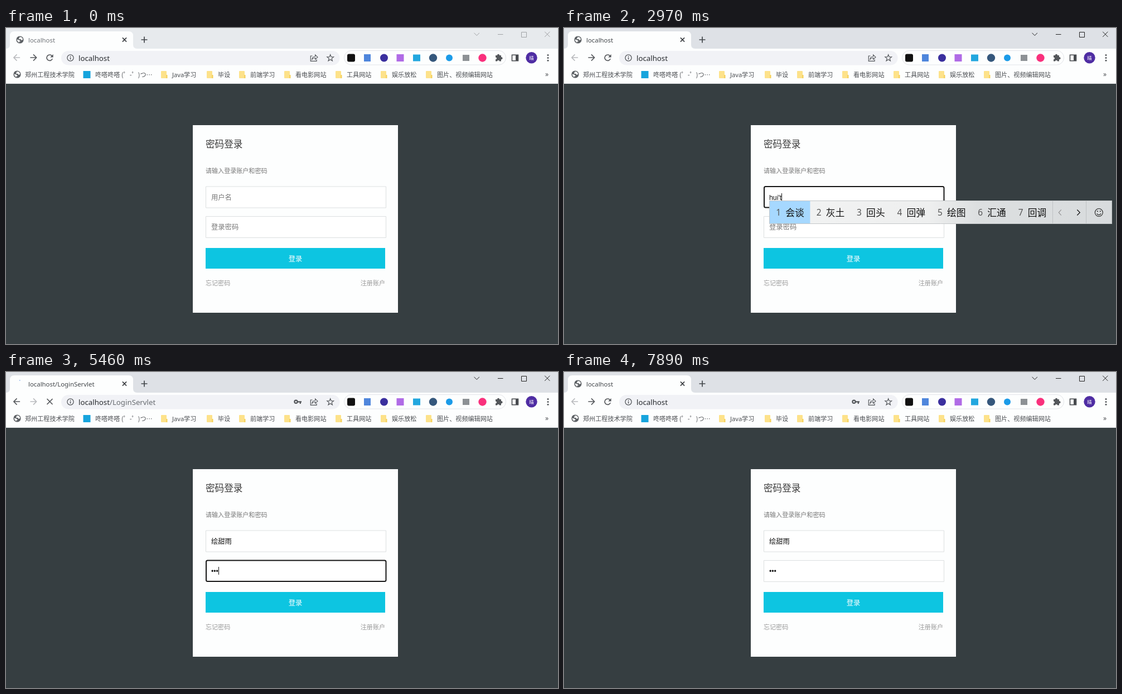
These frames come from a looping animation (990x566 px, 8 s). An HTML page with a canvas:

```html
<!DOCTYPE html>
<html lang="zh-CN">
<head>
<meta charset="utf-8">
<title>Login</title>
<style>
html, body { margin: 0; width: 100%; height: 100%; overflow: hidden; background: #fdfefe; }
canvas { display: block; width: 990px; height: 566px; }
</style>
</head>
<body>
<canvas id="stage"></canvas>
<script>
const W = 990, H = 566, LOOP = 8000;
const canvas = document.getElementById('stage');
const dpr = window.devicePixelRatio || 1;
canvas.width = W * dpr;
canvas.height = H * dpr;
const c = canvas.getContext('2d');

const UI = '"Noto Sans", "Noto Sans CJK SC", sans-serif';
const HAN = '"Noto Sans CJK SC", "Noto Sans CJK", sans-serif';
const ARIAL = '"Liberation Sans", "Noto Sans CJK SC", sans-serif';
const DARK = '#54575b', FAINT = '#b9bbbe', PAPER = '#fdfefe';
const NAME = '绘甜雨';

// Typed letters: time, composed text
const KEYS = [
  [2460, 'h'], [2610, 'hu'], [2760, 'hui'], [2970, "hui't"], [3060, "hui'ti"],
  [3180, "hui'tia"], [3300, "hui'tian"], [3450, "hui'tian'y"], [3510, "hui'tian'yu"]
];
const CHOICES = [
  [2460, '和 好 会 还 后 很 或'],
  [2610, '户 湖 胡 虎 护 呼 互'],
  [2760, '会 回 汇 灰 惠 绘 挥'],
  [2970, '会谈 灰土 回头 回弹 绘图 汇通 回调'],
  [3180, '回天 会填 回填 汇添 绘甜 灰田 惠田'],
  [3450, NAME + ' 回天 会填 回填 汇添 绘甜 灰田']
];
const BOOKMARKS = [
  [298, 'Java学习'], [380, '毕设'], [438, '前端学习'], [519, '看电影网站'],
  [611, '工具网站'], [692, '娱乐放松'], [773, '图片、视频编辑网站']
];

const within = (t, a, b) => t >= a && t < b;
const latest = (list, t) => list.filter(e => e[0] <= t).pop()[1];

function rect(x, y, w, h, color) {
  c.fillStyle = color;
  c.fillRect(x, y, w, h);
}
function round(x, y, w, h, r, fill, stroke, lw = 1) {
  c.beginPath();
  c.roundRect(x, y, w, h, r);
  if (fill) { c.fillStyle = fill; c.fill(); }
  if (stroke) { c.strokeStyle = stroke; c.lineWidth = lw; c.stroke(); }
}
function disc(x, y, r, color) {
  c.beginPath();
  c.arc(x, y, r, 0, 7);
  c.fillStyle = color;
  c.fill();
}
function ring(x, y, r, color, lw = 1.3, from = 0, to = Math.PI * 2) {
  c.beginPath();
  c.arc(x, y, r, from, to);
  c.strokeStyle = color;
  c.lineWidth = lw;
  c.stroke();
}
function path(d, color, lw = 1.5, fill) {
  const p = new Path2D(d);
  if (fill) { c.fillStyle = color; c.fill(p); return; }
  c.strokeStyle = color;
  c.lineWidth = lw;
  c.stroke(p);
}
// cy is the middle of the tall letters
function text(s, x, cy, size, color, font = UI, align = 'left', weight = 400) {
  c.font = `${weight} ${size}px ${font}`;
  c.textAlign = align;
  c.fillStyle = color;
  c.fillText(s, x, cy + size * 0.37);
  return c.measureText(s).width;
}
function cross(x, y, r, color, lw) {
  path(`M${x - r} ${y - r}L${x + r} ${y + r}M${x + r} ${y - r}L${x - r} ${y + r}`, color, lw);
}

function globe(x, y) {
  c.save();
  c.translate(x, y);
  disc(0, 0, 6.6, '#5c6064');
  path('M-1 -5 L3 -4.6 Q5.6 -2 5 0 L2.4 1 L1.6 -1 L-1.4 -1 L-2.4 -2.8 L-.6 -3 Z', '#fff', 1, true);
  path('M-5.2 -.4 L-2 .2 L.6 2 L.2 3.4 L-1.4 3.2 L-1.6 5.2 Q-5 3.4 -5.2 -.4 Z', '#fff', 1, true);
  c.restore();
}

function arrow(x, dir, color) {
  const y = 53, tip = x + 5.6 * dir;
  path(`M${x - 5.6 * dir} ${y}H${tip}M${x} ${y - 5.6}L${tip} ${y}L${x} ${y + 5.6}`, color, 1.6);
}

function star(x, y) {
  c.beginPath();
  for (let i = 0; i < 10; i++) {
    const r = i % 2 ? 2.6 : 6.2, a = i * Math.PI / 5 - Math.PI / 2;
    c.lineTo(x + r * Math.cos(a), y + r * Math.sin(a));
  }
  c.closePath();
  c.strokeStyle = DARK;
  c.lineWidth = 1.2;
  c.stroke();
}

function tabStrip(s) {
  rect(0, 0, W, 37, s.active ? '#dee1e6' : '#e7eaed');
  path('M0 37Q7 37 7 30V14Q7 6 15 6H220Q228 6 228 14V30Q228 37 235 37Z', PAPER, 1, true);
  if (s.loading) ring(25, 21, 6, '#7fa9ea', 1.5, -1.75, -1.5);
  else globe(25, 21);
  text(s.title, 40, 21.5, 11.36, s.active ? '#43474b' : '#71757a');
  cross(212.5, 21, 3.6, '#36393d', 1.5);
  path('M242.5 21H253.5M248 15.5V26.5', '#43474b', 1.7);

  const k = s.active ? '#222' : '#a0a2a5';
  path('M839.5 8.8L844.2 13.5L849 8.8', k, 1);
  path('M882 11.5H891.5', k, 1);
  path('M924.5 7.5H933.5V16.5H924.5Z', k, 1);
  cross(970.8, 11.3, 4.6, k, 1);
}

function toolbar(s) {
  rect(0, 37, W, 62, PAPER);
  if (s.hover > 0) {
    c.globalAlpha = s.hover;
    disc(20, 53, 13, '#e6e7e9');
    c.globalAlpha = 1;
  }
  arrow(19.5, -1, s.canBack ? DARK : FAINT);
  arrow(49, 1, s.canBack ? FAINT : DARK);
  if (s.loading) cross(78.5, 53, 5, DARK, 1.7);
  else {
    ring(78.3, 53.2, 5.2, DARK, 1.6, 0.35, 5.6);
    path('M84.6 47V52.4H79.2Z', DARK, 1, true);
  }

  round(99, 41, 499.5, 25.5, 12.8, '#f1f2f6');
  ring(115.5, 53.5, 5.6, DARK, 1.3);
  rect(114.8, 52.7, 1.5, 3.8, DARK);
  rect(114.8, 50.2, 1.5, 1.5, DARK);
  const w = text('localhost', 130, 54, 13.25, '#26292d');
  if (s.servlet) text('/LoginServlet', 130 + w, 54, 13.25, '#686c71');
  if (s.key) {
    ring(520, 53.3, 2.6, DARK, 2.2);
    path('M522.5 53.3H530M527.8 53.5V57', DARK, 2.2);
  }
  path('M549.5 50H546.3V59.3H557V56.3', DARK, 1.2);
  path('M548.8 56.2Q549.5 51.2 554.6 51V48L559 52.2L554.6 56.2V53.5Q551 53.4 548.8 56.2Z', DARK, 1.1);
  star(581.7, 53.8);
  extensions();
}

function extensions() {
  round(606.5, 40.5, 290, 25.5, 12.8, PAPER, '#e2e4e8');
  round(612, 46.5, 14, 14, 3, '#111');
  rect(642, 47, 12, 13, '#4f86dc');
  disc(678, 53.5, 7, '#3a2f9e');
  rect(700.5, 47, 13, 13, '#b06be6');
  rect(730, 47.5, 13, 12, '#22a7df');
  disc(766, 53.5, 7.2, '#35577c');
  disc(795, 53.5, 6, '#1b9be8');
  rect(819, 48, 12, 11, '#8d9195');
  disc(854.5, 53.5, 7.2, '#f9307c');

  rect(878, 49, 10, 10.5, DARK);
  disc(883, 48.8, 2.1, DARK);
  disc(888.4, 54.2, 2.1, DARK);
  disc(878.2, 54.4, 1.8, PAPER);
  disc(883, 59.6, 1.8, PAPER);

  path('M907.5 48.2H918.5V58.8H907.5Z', '#484b4f', 1.6);
  rect(914, 48, 5, 11, '#484b4f');
  disc(942.5, 53.3, 10.2, '#4f2da3');
  text('晴', 942.5, 53.5, 8.5, '#fff', HAN, 'center');
  for (const y of [48.6, 53.4, 58.2]) disc(972, y, 1.5, DARK);
}

function bookmarks() {
  const ink = '#4a4d51';
  globe(20, 83);
  text('郑州工程技术学院', 34, 84, 11.1, ink, HAN);
  rect(138.5, 77, 13, 13, '#16a4dd');
  text('咚嗒咚嗒 (゜-゜)つ…', 160, 84, 11.1, ink, HAN);
  for (const [x, label] of BOOKMARKS) {
    round(x - 20, 77, 10, 13, 1, '#fde28a');
    rect(x - 11, 84, 2.5, 6, '#f6d25f');
    text(label, x, 84, 11.1, ink);
  }
  text('»', 967, 83, 12, ink);
  rect(0, 99, W, 1, '#dcdee1');
}

function field(y, focused) {
  if (focused) round(359, y + 0.5, 322.5, 37.5, 2.5, '#fff', '#151515', 2);
  else round(358.5, y + 0.5, 323, 38, 0, '#fff', '#dcdfe0');
}

function loginPage(s) {
  rect(0, 100, W, 466, '#363e41');
  rect(335, 174, 368, 336, PAPER);
  text('密码登录', 358, 207.5, 16.6, '#3a3a3a', HAN);
  text('请输入登录账户和密码', 358, 256, 11.05, '#777', HAN);

  field(283.5, s.focus === 1);
  field(337, s.focus === 2);
  let w = 0;
  if (s.user) w = text(s.user, 368, 303, 12.3, '#111', ARIAL);
  else text('用户名', 368, 303, 12.3, '#777', HAN);
  if (s.focus === 1 && s.caret) rect(Math.round(368 + w), 296, 1, 14, '#111');

  w = 0;
  if (s.dots) w = text('•'.repeat(s.dots), 368, 356, 12.3, '#111', ARIAL);
  else text('登录密码', 368, 356, 12.3, '#777', HAN);
  if (s.focus === 2) rect(Math.round(368 + w), 349, 1, 14, '#111');

  rect(358, 394, 322, 37, '#0dc5e1');
  text('登录', 519, 413, 12.3, '#fff', HAN, 'center');
  text('忘记密码', 358, 457, 11.05, '#999', HAN);
  text('注册账户', 680, 457, 11.05, '#999', HAN, 'right');
}

function candidates(list) {
  const em = 16.8, pad = 38.8, top = 309, h = 42;
  const widths = list.map(s => s.length * em + pad);
  const nav = 369 + widths.reduce((a, b) => a + b, 0);
  const end = nav + 107;
  const tint = c.createLinearGradient(368, 0, 990, 0);
  tint.addColorStop(0, '#f2f3f3');
  tint.addColorStop(0.46, '#eeefef');
  tint.addColorStop(0.6, '#dcdfe0');
  tint.addColorStop(1, '#d8dbdd');
  rect(368, top, end - 368, h, tint);
  path(`M368.5 309.5H${end - 0.5}V350.5H368.5Z`, '#c3c6c8', 1);
  rect(369, 310, widths[0], 40, '#a6d8ff');
  let x = 369;
  list.forEach((s, i) => {
    text(i + 1, x + 11.3, 330.5, 15.4, '#555');
    text(s, x + 28.3, 331, em, '#111', HAN);
    x += widths[i];
  });
  rect(Math.round(nav), 310, 1, 40, '#bfc2c4');
  rect(Math.round(nav + 60), 310, 1, 40, '#bfc2c4');
  path(`M${nav + 16} 325.5L${nav + 11.5} 330.5L${nav + 16} 335.5`, '#888', 1.1);
  path(`M${nav + 44.5} 325.5L${nav + 49.5} 330.5L${nav + 44.5} 335.5`, '#111', 1.2);
  const fx = nav + 83.5;
  ring(fx, 330.5, 7, '#222', 1.1);
  ring(fx, 331, 3.8, '#222', 1.1, 0.3, Math.PI - 0.3);
  disc(fx - 2.5, 328.3, 1, '#222');
  disc(fx + 2.5, 328.3, 1, '#222');
}

function welcomePage() {
  rect(0, 100, W, 466, PAPER);
  text('登录成功了！', 6.5, 129, 29.5, '#000', HAN, 'left', 700);
  text('欢迎您：' + NAME, 7, 177, 14.7, '#111', HAN);
}

function stateAt(t) {
  const servlet = within(t, 5400, 7440);
  const fadeIn = Math.floor((t - 6840) / 110 + 1) / 4;
  const fadeOut = t < 7770 ? 1 : t < 7890 ? 0.5 : 0;
  return {
    active: t >= 300,
    servlet,
    canBack: servlet,
    title: servlet ? 'localhost/LoginServlet' : 'localhost',
    loading: within(t, 5310, 5490),
    key: t >= 4650,
    welcome: within(t, 5490, 7440),
    hover: Math.min(Math.max(fadeIn, 0), 1, fadeOut),
    focus: within(t, 390, 4170) ? 1 : within(t, 4170, 5490) ? 2 : 0,
    caret: t < 900 || within(t, 1380, 2010) || t >= 2460,
    user: t >= 3810 ? NAME : t >= 2460 ? latest(KEYS, t) : within(t, 1530, 2100) ? 'h' : '',
    dots: [4590, 4740, 4950].filter(k => t >= k).length,
    choices: within(t, 2460, 3810) ? latest(CHOICES, t).split(' ') : null
  };
}

function draw() {
  const s = stateAt(performance.now() % LOOP);
  c.setTransform(dpr, 0, 0, dpr, 0, 0);
  tabStrip(s);
  toolbar(s);
  bookmarks();
  if (s.welcome) welcomePage();
  else loginPage(s);
  if (s.choices) candidates(s.choices);
  requestAnimationFrame(draw);
}
draw();
</script>
</body>
</html>
```
